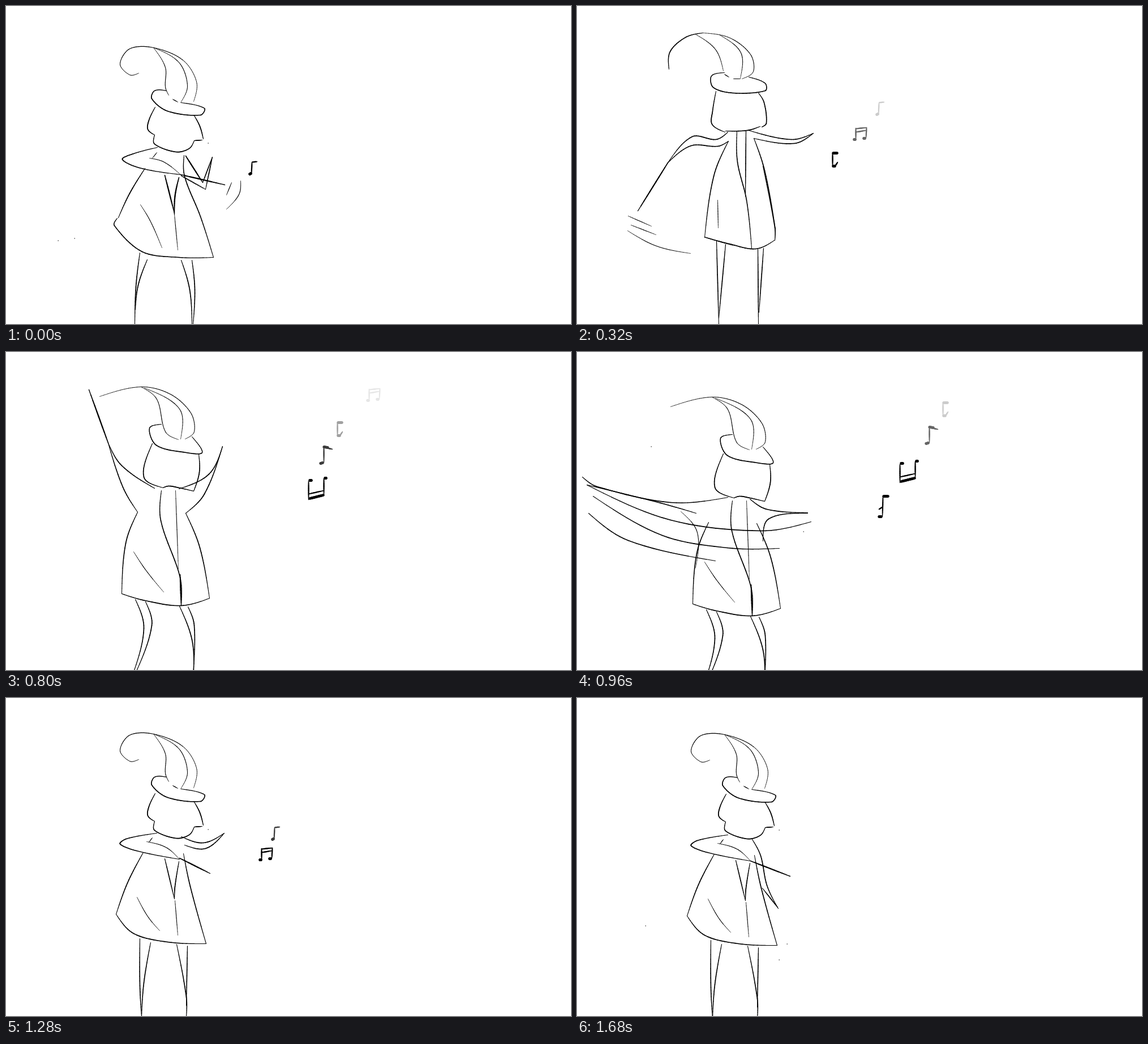
Recreate the animation shown at these times as an HTML page with a canvas. Size 998 by 561 pixels, loop 1840 ms.

```html
<!DOCTYPE html>
<html lang="en">
<head>
<meta charset="utf-8">
<title>Conductor</title>
<style>
  html, body { margin: 0; width: 100%; height: 100%; overflow: hidden; background: #fff; }
  canvas { display: block; }
</style>
</head>
<body>
<canvas id="stage" width="998" height="561"></canvas>
<script>
const ctx = document.getElementById('stage').getContext('2d');
ctx.lineCap = 'round';

// Tapered stroke: a smooth curve through the given points.
function stroke(width, points) {
  const p = points.split(' ').map(s => s.split(',').map(Number));
  const last = p.length - 1;
  const gap = (i, j) => Math.hypot(p[j][0] - p[i][0], p[j][1] - p[i][1]) || 1;
  const slope = (i, j, k) => (p[j][k] - p[i][k]) / gap(i, j);
  const inner = (i, k) =>
    (p[i + 1][k] - p[i - 1][k]) / (gap(i - 1, i) + gap(i, i + 1));
  const speed = (i, k) => {
    if (last === 1) return slope(0, 1, k);
    if (i === 0) return 1.5 * slope(0, 1, k) - inner(1, k) / 2;
    if (i === last) return 1.5 * slope(i - 1, i, k) - inner(i - 1, k) / 2;
    return inner(i, k);
  };
  const steps = 10;
  let from = p[0];
  for (let i = 0; i < last; i++) {
    const d = gap(i, i + 1);
    for (let n = 1; n <= steps; n++) {
      const u = n / steps, v = 1 - u;
      const to = [0, 1].map(k =>
        v * v * (1 + 2 * u) * p[i][k] + u * u * (3 - 2 * u) * p[i + 1][k] +
        d * u * v * (v * speed(i, k) - u * speed(i + 1, k)));
      const swell = Math.sin(Math.PI * (i + u) / last);
      ctx.lineWidth = width < 3 ? width * (0.6 + 0.4 * swell) : width;
      ctx.beginPath();
      ctx.moveTo(...from);
      ctx.lineTo(...to);
      ctx.stroke();
      from = to;
    }
  }
}
const pens = width => (...lines) => lines.forEach(line => stroke(width, line));
const hair = pens(1.1), pen = pens(1.7), brush = pens(2.3), blot = pens(4.5);

function dot(x, y) {
  ctx.fillRect(x, y, 1.5, 1);
}

function at(x, y, part, grey = 0) {
  ctx.save();
  ctx.translate(x + 0.5, y + 0.5);
  ctx.strokeStyle = ctx.fillStyle = `rgb(${grey},${grey},${grey})`;
  part();
  ctx.restore();
}

// Figure

function profile() {
  hair('234,118 218,121 201,102 218,75 260,73 312,95 336,133 331,168');
  hair('260,73 305,99 320,140 308,170');
  hair('260,73 281,108 281,142 287,157');
  hair('294,164 303,169');
  pen('283,149 262,149 257,163 285,185 343,192 350,180 309,170');
  pen('263,178 252,201 250,217 262,227');
  pen('262,227 262,243 300,257 323,251 332,237');
  pen('332,237 346,236', '348,234 342,212 332,193');
  dot(356, 241);
}

function playing() {
  pen('267,249 225,260 205,270 235,285 308,297');
  hair('266,258 258,268', '253,268 279,275 310,299');
  pen('245,286 218,330 198,373');
  pen('196,374 191,387 240,433 305,443 366,443');
  pen('314,263 315,300 343,371 366,443');
  brush('280,298 297,365', '305,302 298,335 297,367');
  hair('297,367 303,430', '237,350 255,380 275,426');
  brush('308,297 386,315', '317,264 347,311');
  pen('347,311 364,266', '364,266 352,323', '309,299 352,323');
  hair('398,311 389,333', '414,308 411,332 389,358');
  pen('236,435 229,495 227,561', '249,447 233,492 228,535');
  pen('328,448 333,500 330,561', '309,448 324,500 328,561');
  dot(91, 413);
  dot(120, 409);
}

function resting() {
  pen('266,241 212,251 201,260 230,272 306,287');
  hair('258,249 252,257', '248,256 282,266 306,287');
  pen('242,275 214,329 194,384');
  pen('194,384 225,418 285,433 353,436');
  pen('353,436 325,335 313,277');
  pen('280,286 297,357', '305,291 298,335 297,357');
  hair('298,360 303,421', '231,354 250,388 271,413');
  pen('236,427 236,510 239,565', '255,434 243,505 239,565');
  pen('301,437 318,530 318,565', '320,440 318,545');
}

function lowered() {
  pen('309,249 324,278 335,330 355,371', '354,369 327,335');
  brush('306,287 376,314');
  dot(120, 401);
  dot(356, 461);
  dot(370, 433);
}

function opening() {
  pen('309,247 348,258 385,241', '385,241 352,268 315,262');
  brush('306,285 360,312');
}

function spread() {
  pen('162,111 164,80 191,55 222,47');
  hair('222,47 270,56 306,85 311,115 291,128');
  hair('208,49 244,76 258,114', '252,51 289,82 288,127');
  hair('260,120 268,125', '276,128 288,128');
  pen('260,117 237,123 240,143 275,153 332,149 332,136 303,125');
  pen('245,150 239,185 238,208 261,222');
  pen('262,220 300,219 323,212', '326,213 334,206 330,170 320,153');
  pen('266,222 245,235 203,230 160,276');
  pen('160,276 201,246 248,247 267,238');
  brush('160,276 107,361');
  pen('303,219 378,235 417,224', '417,224 383,242 312,233');
  pen('267,238 241,300 225,408', '225,407 268,419 315,428 348,413');
  pen('312,233 331,290 350,393', '328,282 349,390 349,413');
  pen('282,221 283,275 299,342 308,427', '298,220 297,335');
  hair('226,408 275,422', '248,342 249,391');
  hair('90,370 131,388', '95,386 139,403', '89,396 140,423 200,436');
  pen('246,415 250,561', '262,420 250,550');
  pen('319,429 320,561', '329,427 321,540');
}

function upright() {
  hair('205,51 255,54 292,77 302,103 268,123');
  hair('188,54 220,60 247,107', '215,51 262,72 282,121');
  hair('247,111 256,119');
  pen('256,117 230,124 231,141 262,152 308,148 329,138 315,123 291,120');
  pen('241,150 237,190 244,218 275,218 304,216');
  pen('304,216 333,214 335,190 320,144');
  hair('302,216 316,222 323,212');
  pen('235,234 243,275 240,340 252,418');
  pen('329,262 335,315 330,424', '254,419 310,428 332,423');
  pen('278,227 288,280 305,360 309,427');
  hair('297,228 306,370', '258,327 265,373');
  brush('308,370 309,428');
  pen('259,420 264,561', '275,423 264,540');
  pen('310,428 312,561', '320,428 312,525');
}

function raised() {
  pen('170,11 178,58 192,96', '170,11 192,11 224,17');
  pen('173,27 222,23', '177,44 215,37');
  brush('192,96 234,18');
  pen('192,96 209,172 244,232', '193,96 201,152 235,234');
  hair('244,232 260,224');
  pen('361,88 353,150 336,205 329,262', '360,89 350,155 335,191');
  dot(127, 173);
  dot(29, 247);
  dot(211, 226);
}

function lifting() {
  pen('244,230 190,208 158,184', '158,184 210,227 235,238');
  brush('158,184 76,179');
  hair('47,205 64,262', '66,207 84,252');
  pen('333,216 372,200 392,171', '392,171 329,262');
}

function bowed() {
  hair('165,96 238,79 290,92 326,125 332,158 316,171');
  hair('238,79 266,101 281,158 304,172', '244,81 306,118 308,171');
  pen('274,145 253,152 265,182 318,195 346,195 328,167');
  pen('258,179 243,238 277,257', '277,257 287,254 305,257 331,263');
  pen('331,263 341,230 340,198');
  pen('232,300 211,355 204,444', '204,444 245,456 308,465 359,452');
  pen('317,302 342,363 359,452');
  pen('274,262 273,315 307,415 309,465');
  hair('299,262 304,400', '225,370 247,403 278,441');
  brush('307,410 309,465');
  pen('228,454 243,505 224,585', '246,458 257,500 228,585');
  pen('306,466 328,525 331,585', '321,467 332,500 330,585');
}

function sweep() {
  pen('9,220 35,237 165,265 266,256', '17,234 140,264 210,284');
  hair('183,281 212,318 209,380');
  pen('17,234 165,296 325,315 413,299');
  pen('28,254 150,323 265,345 357,346');
  pen('20,284 90,332 244,368');
  pen('305,259 335,277 407,283', '407,284 338,294 328,333');
  dot(130, 166);
  dot(399, 316);
}

function falling() {
  pen('262,240 204,200 180,160', '180,160 206,238 232,282');
  brush('180,160 146,66');
  pen('305,241 358,215 382,166', '382,166 350,250 317,284');
}

const tailLow = () => hair('139,104 165,70 205,51');
const tailHigh = () => hair('132,93 170,63 205,51');
const tailCurl = () => hair('152,110 168,74 205,51');

// Notes

function quaver() {
  brush('0,1 9,0', '0,2 -1,22');
  blot('-4,22 -2,21');
}
function eighth() {
  brush('0,0 0,28');
  blot('0,1 7,2', '-6,30 -2,29');
  brush('6,3 15,5');
}
function beamed() {
  brush('-8,-9 11,-11', '-8,-3 10,-6', '-8,-10 -8,10', '11,-11 10,7');
  blot('-11,10 -9,10', '6,8 8,8');
}
function hook() {
  blot('-3,-12 4,-12', '-3,11 0,11');
  brush('-4,-12 -4,11', '1,10 5,4');
}
function cradle() {
  brush('-16,-12 -16,20', '11,-17 11,11', '-16,10 11,4');
  blot('-14,-14 -11,-14', '13,-18 15,-18', '-14,18 10,12');
}
function barred() {
  brush('-1,-17 -2,17', '-8,5 -2,1');
  blot('0,-18 8,-18', '-8,18 -4,18');
}

// Scenes

const scenes = [];
const scene = paint => scenes.push(paint);
const pose = (...parts) => parts.forEach(part => at(0, 0, part));

function approach(lift, x, y) {
  at(0, lift, profile);
  at(0, -3, resting);
  at(0, -3, opening);
  at(x, y, quaver, 60);
  at(x - 15, y + 48, beamed);
}
function reach(tail) {
  pose(upright, raised, tail);
  at(573, 125, beamed, 204);
  at(528, 171, hook, 102);
  at(500, 201, eighth);
}
function rest() {
  at(0, -9, profile);
  pose(resting, lowered);
}

scene(() => {
  pose(profile, playing);
  at(434, 274, quaver);
});
scene(() => approach(-13, 477, 224));
scene(() => {
  pose(spread);
  at(533, 169, quaver, 204);
  at(500, 225, beamed, 102);
  at(455, 271, hook);
});
scene(() => {
  pose(upright, lifting, tailCurl);
  at(541, 176, beamed, 170);
  at(493, 220, hook, 60);
  at(472, 250, eighth);
});
scene(() => reach(tailLow));
scene(() => {
  at(0, -18, bowed);
  pose(falling);
  at(649, 75, beamed, 230);
  at(589, 136, hook, 160);
  at(561, 166, eighth, 60);
  at(550, 240, cradle);
});
scene(() => {
  pose(bowed, sweep);
  at(650, 101, hook, 204);
  at(622, 131, eighth, 102);
  at(586, 210, cradle);
  at(541, 272, barred);
});
scene(() => reach(tailHigh));
scene(() => approach(-10, 474, 227));
scene(rest);
scene(() => {
  at(0, -8, profile);
  at(-3, 1, resting);
  pose(lowered);
});
scene(rest);

const loop = 1840, beat = 160;
const start = performance.now();
let shown;

function tick() {
  const t = (performance.now() - start) % loop;
  // The second-to-last scene is held for only half a beat.
  const now = t < 1680 ? Math.floor(t / beat) : scenes.length - 1;
  if (now !== shown) {
    shown = now;
    ctx.clearRect(0, 0, 998, 561);
    scenes[now]();
  }
  requestAnimationFrame(tick);
}
tick();
</script>
</body>
</html>
```
